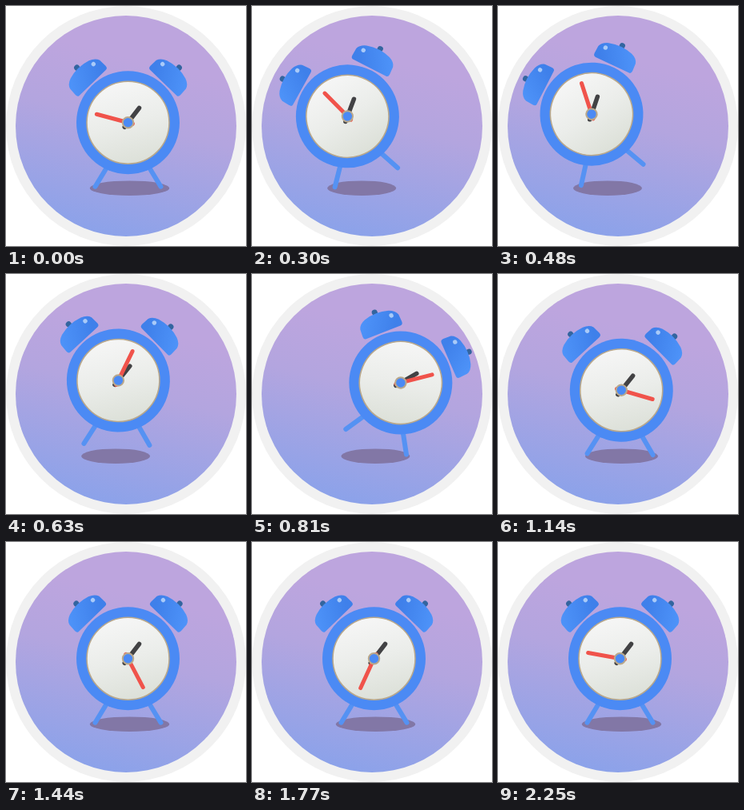
An HTML page that plays this animation: 300x300 px, repeating every 2.28 s.

```html
<!DOCTYPE html>
<html lang="en">
<head>
<meta charset="utf-8">
<title>Alarm clock</title>
<style>
  html, body { margin: 0; width: 100%; height: 100%; overflow: hidden; background: #fff; }
  svg { display: block; width: 100vw; height: 100vh; }
</style>
</head>
<body>
<svg viewBox="0 0 300 300">
  <defs>
    <linearGradient id="sky" gradientUnits="userSpaceOnUse" x1="178" y1="70" x2="125" y2="292">
      <stop offset="0" stop-color="#bda5de"/>
      <stop offset=".35" stop-color="#b3a5df"/>
      <stop offset="1" stop-color="#8aa2ea"/>
    </linearGradient>
    <linearGradient id="dial" x1=".35" y1="0" x2=".6" y2="1">
      <stop offset="0" stop-color="#f6f6f6"/>
      <stop offset=".5" stop-color="#ebedea"/>
      <stop offset="1" stop-color="#dce0d8"/>
    </linearGradient>
    <linearGradient id="metal" x1="0" y1="0" x2="1" y2=".3">
      <stop offset="0" stop-color="#5096fb"/>
      <stop offset="1" stop-color="#3f80ea"/>
    </linearGradient>
    <g id="bell">
      <circle cx="-1" cy="-26" r="3.6" fill="#33659f"/>
      <path d="M-23 1Q-26 1-26-3L-25.5-13Q-24-19-16-22Q0-27 16-22Q24-19 26-13L26.500-3Q26.500 1 23 1Z" fill="url(#metal)"/>
      <circle cx="17" cy="-15" r="2.7" fill="#a9caf8"/>
    </g>
  </defs>
  <circle cx="150" cy="150" r="150" fill="#f1f1f1"/>
  <circle cx="150" cy="150" r="138" fill="url(#sky)"/>
  <ellipse id="shadow" cy="227.700" ry="9.300" fill="#8277a6"/>
  <g id="clock">
    <path d="M-24 52L-41 80M24 52L41 80" stroke="#5592f3" stroke-width="6" stroke-linecap="round"/>
    <g id="left"><use href="#bell"/></g>
    <g id="right"><use href="#bell"/></g>
    <circle r="64.500" fill="#4b8af4"/>
    <circle r="51.500" fill="url(#dial)" stroke="#b9a88c" stroke-width="1.600"/>
    <path d="M0 7V-23" transform="rotate(37.500)" stroke="#424244" stroke-width="5.500" stroke-linecap="round"/>
    <path id="minute" d="M0 6V-40.500" stroke="#f0534b" stroke-width="5" stroke-linecap="round"/>
    <circle r="6.700" fill="#4b8af4" stroke="#b9a88c" stroke-width="2"/>
  </g>
</svg>
<script>
const LOOP = 2280, STEP = 30;
const $ = id => document.getElementById(id);
const clock = $('clock'), minute = $('minute'), shadow = $('shadow');
const left = $('left'), right = $('right');

const clamp = v => Math.max(0, Math.min(1, v));
const ease = (t, a, b) => (1 - Math.cos(Math.PI * clamp((t - a) / (b - a)))) / 2;
const bump = (t, a, b) => Math.sin(Math.PI * clamp((t - a) / (b - a)));

// Start value followed by [from, to, value] moves.
const track = (t, start, ...moves) => {
  let v = start;
  for (const [a, b, to] of moves) v += (to - v) * ease(t, a, b);
  return v;
};

function draw(t) {
  const x = track(t, 152.5, [0, 360, 117], [500, 830, 186.5], [965, 1170, 152.5]);
  const y = track(t, 145.7, [0, 400, 136.5], [965, 1170, 145.7]) - 3.5 * bump(t, 430, 830);
  const tilt = track(t, 0, [0, 420, -21], [420, 835, 23], [965, 1170, 0]);
  clock.setAttribute('transform', `translate(${x} ${y}) rotate(${tilt})`);
  minute.setAttribute('transform', `rotate(${285 + 360 * t / LOOP})`);

  const out = 1.5 * (ease(t, 1080, 1170) - ease(t, 1200, 1680));
  const place = `translate(${-45 - out} -50.5) rotate(-44)`;
  left.setAttribute('transform', place);
  right.setAttribute('transform', 'scale(-1 1) ' + place);

  shadow.setAttribute('cx', track(t, 154.5, [0, 320, 137], [620, 820, 154.5]));
  shadow.setAttribute('rx', track(t, 49.7, [0, 320, 43], [1030, 1290, 49.7]));
}

const begin = performance.now();
function tick() {
  const t = (performance.now() - begin) % LOOP;
  draw(Math.floor(t / STEP) * STEP);
  requestAnimationFrame(tick);
}
tick();
</script>
</body>
</html>
```
